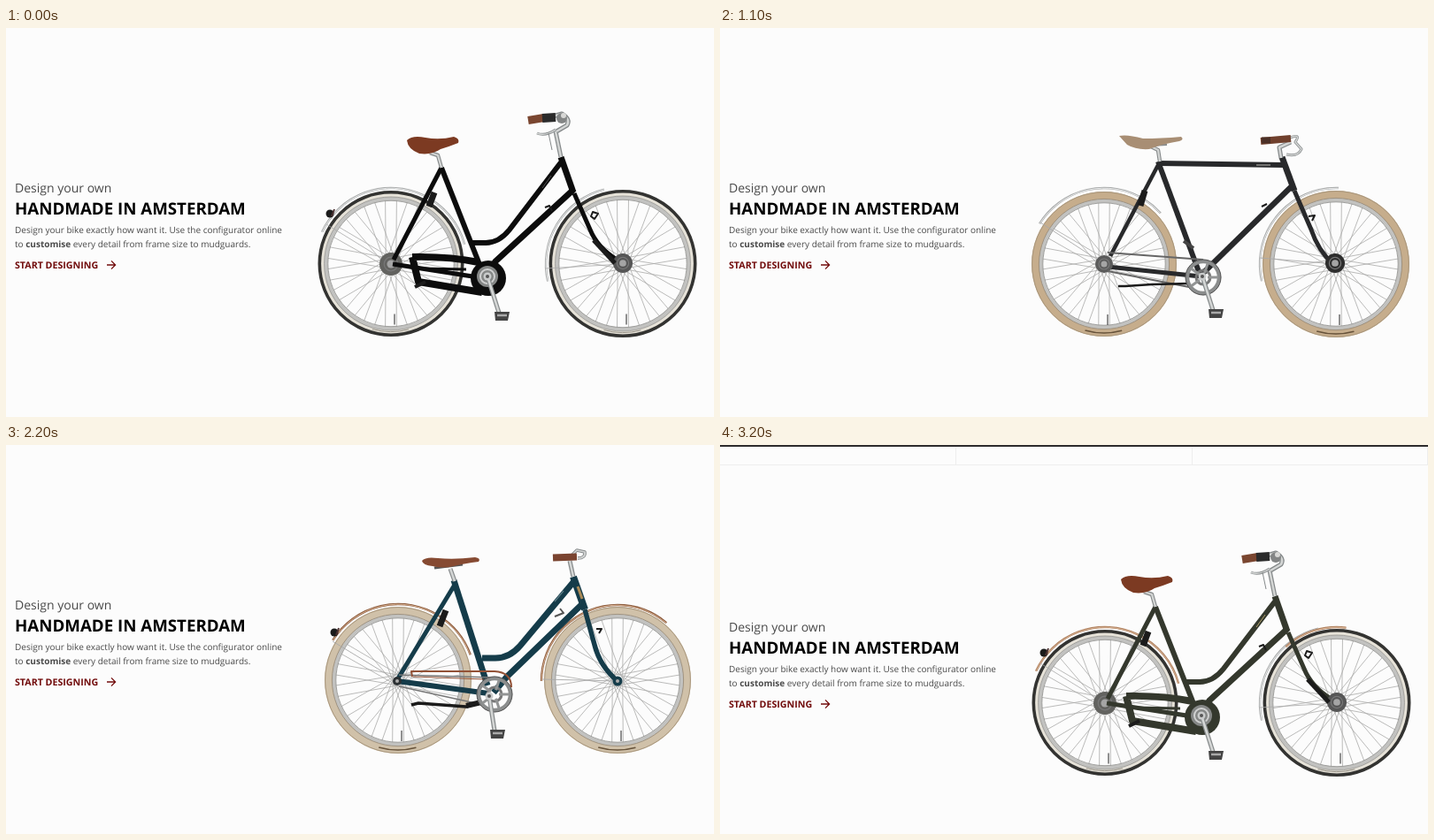
An HTML page with a canvas that plays this animation: 800x440 px, repeating every 3300 ms.

```html
<!DOCTYPE html>
<html lang="en">
<head>
<meta charset="utf-8">
<title>Bike configurator</title>
<style>
  html, body { margin: 0; width: 100%; height: 100%; overflow: hidden; background: #fcfcfc; }
  canvas, svg { position: absolute; left: 0; top: 0; }
  text { font-family: "Open Sans", sans-serif; text-rendering: geometricPrecision; fill: #4a4a4a; }
  .lead { font-size: 14px; }
  .title { font-size: 18.72px; font-weight: 700; fill: #000; }
  .body { font-size: 10.02px; }
  .link { font-size: 10.67px; font-weight: 700; fill: #720d0d; }
  .bold { font-weight: 700; }
</style>
</head>
<body>
<canvas id="stage" width="800" height="440"></canvas>
<svg width="800" height="440">
  <g id="copy">
    <text class="lead" x="10" y="186">Design your own</text>
    <text class="title" x="10" y="211">HANDMADE IN AMSTERDAM</text>
    <text class="body" x="10" y="231.8">Design your bike exactly how want it. Use the configurator online</text>
    <text class="body" x="10" y="248.4">to <tspan class="bold">customise</tspan> every detail from frame size to mudguards.</text>
    <text class="link" x="10" y="271.6">START DESIGNING</text>
    <path d="M114 268H123.5M119 263.4L123.6 268L119 272.6" fill="none" stroke="#720d0d" stroke-width="1.3"/>
  </g>
</svg>
<script>
const ctx = document.getElementById('stage').getContext('2d');
const copy = document.getElementById('copy');
const STEP = 100, STEPS = 33, TAU = Math.PI * 2;
const SILVER = '#a9abab', STEEL = '#85898a', DARK = '#1b1b1b', BROWN = '#7c3a22', COPPER = '#b0815f';

function stroke(d, width, color) {
  ctx.lineWidth = width;
  ctx.strokeStyle = color;
  ctx.stroke(new Path2D(d));
}
function fill(d, color) {
  ctx.fillStyle = color;
  ctx.fill(new Path2D(d));
}
// Angles in degrees, clockwise from the right.
function arc(x, y, r, width, color, from = 0, to = 360) {
  ctx.beginPath();
  ctx.arc(x, y, r, from * TAU / 360, to * TAU / 360);
  ctx.lineWidth = width;
  ctx.strokeStyle = color;
  ctx.stroke();
}
function disc(x, y, r, color) {
  ctx.beginPath();
  ctx.arc(x, y, r, 0, TAU);
  ctx.fillStyle = color;
  ctx.fill();
}
function chrome(d, width) {
  stroke(d, width, STEEL);
  stroke(d, width * 0.5, '#d4d6d5');
}

function spokes(x, y, r) {
  ctx.beginPath();
  for (let i = 0; i < 36; i++) {
    const a = (i + 0.5) * TAU / 36, b = a + (i % 2 ? 1.2 : -1.2);
    ctx.moveTo(x + 6 * Math.cos(b), y + 6 * Math.sin(b));
    ctx.lineTo(x + r * Math.cos(a), y + r * Math.sin(a));
  }
  ctx.lineWidth = 0.8;
  ctx.strokeStyle = '#aaaaa9';
  ctx.stroke();
}
function wheel(x, y, r, tan) {
  const rim = tan ? r - 10.5 : r - 9;
  spokes(x, y, rim);
  arc(x, y, rim, 4.5, '#c2c2c0');
  arc(x, y, rim - 2.3, 0.8, '#8d8d8b');
  if (tan) {
    arc(x, y, r - 4.3, 8.6, tan);
    arc(x, y, r - 0.6, 1, '#a8967c');
    arc(x, y, r - 8.4, 0.8, '#938673');
    arc(x, y, r - 4, 1.6, '#66523a', 75, 106);
  } else {
    arc(x, y, r - 5, 4, '#e6e2d8');
    arc(x, y, r - 7, 0.7, '#8f8d88');
    arc(x, y, r - 1.8, 3.6, '#333331');
    arc(x, y, r - 5.4, 1, '#99948a', 75, 106);
  }
  stroke(`M${x + 4} ${y + 57}V${y + 69}`, 1.3, '#555');
}
function hub(x, y, r, color) {
  disc(x, y, r, color);
  arc(x, y, r * 0.6, 1.2, '#777');
  disc(x, y, r * 0.35, '#a5a5a5');
}
function fender(x, y, r, from, to, color) {
  arc(x, y, r, 2.4, color, from, to);
  arc(x, y, r - 0.2, 1, color === SILVER ? '#eaebeb' : '#d6b294', from, to);
}
function crank(x, y, px, py) {
  chrome(`M${x} ${y}L${px - 4} ${py - 4}`, 5);
  disc(x, y, 4.5, '#c9cbcb');
  disc(x, y, 2, '#555');
  fill(`M${px - 9} ${py - 5}H${px + 8}L${px + 6} ${py + 5}H${px - 8}Z`, '#444');
  stroke(`M${px - 6} ${py - 1}H${px + 5}`, 2.5, '#aaa');
}
function chainring(x, y) {
  arc(x, y, 18, 4.5, '#8b8d8d');
  arc(x, y, 20, 1, '#555');
  arc(x, y, 8, 3, '#777');
  for (let i = 0; i < 5; i++) {
    const a = i * TAU / 5, c = Math.cos(a), s = Math.sin(a);
    stroke(`M${x + 5 * c} ${y + 5 * s}L${x + 17 * c} ${y + 17 * s}`, 3, '#929494');
  }
}
function rearLight(x, y) {
  disc(x, y, 4.5, DARK);
  stroke(`M${x + 2} ${y + 3}L${x + 5} ${y - 5}`, 2, '#4b3030');
}

function carrierRack() {
  chrome('M651 171L655 177L664 179L731 170Q741 170 738 180L727 212Q721 228 700 248', 4);
  stroke('M706 205L728 203M700 248L703 205L724 176', 1.5, STEEL);
}
function basket() {
  fill('M657 136L732 121L727 176L651 171Z', '#e4e5e599');
  for (let i = 0; i <= 18; i++) {
    const k = i / 18;
    stroke(`M${657 + 75 * k} ${136 - 15 * k}L${651 + 76 * k} ${171 + 5 * k}`, 0.8, '#989a9a');
  }
  for (let i = 0; i <= 5; i++) {
    const k = i / 5;
    stroke(`M${657 - 6 * k} ${136 + 35 * k}L${732 - 5 * k} ${121 + 55 * k}`, i % 5 ? 0.7 : 2, '#8f9191');
  }
}

function cityBike({ geared, green, copper, springs, carrier, mesh, lock }) {
  const paint = green ? '#34382d' : '#0c0c0c', guard = copper ? COPPER : SILVER;
  wheel(435, 266.5, 82.5);
  wheel(697, 266.5, 83.5);
  fender(435, 267, 86, 205, 345, guard);
  fender(697, 267, 87, 167, 256, SILVER);
  if (copper) fender(697, 267, 86, 228, 277, COPPER);
  stroke('M609 272L697 267M362 222L435 267', 0.8, '#aaa');
  rearLight(366, 210);

  if (geared) {
    hub(435, 267, 13, '#62625f');
  } else {
    disc(435, 267, 6, STEEL);
  }
  stroke('M492 158L438 262', 5, paint);
  stroke('M437 267L540 283', 5, paint);
  stroke('M492 158L538 275', 6, paint);
  stroke('M627 152L569 228Q557 243 542 243H524', 6, paint);
  stroke('M641 183L553 264L543 280', 7, paint);
  stroke('M627 146L641 186', 7, paint);
  stroke(geared ? 'M642 187L660 228Q668 248 690 262' : 'M642 187L660 228Q666 242 682 252T698 266', 5, paint);
  stroke('M616 167L606 181', 1, green ? '#b7a56f' : '#555');
  stroke('M484 186L478 202', 7, DARK);
  stroke('M663 208L669 210L665 216L661 213Z', 2, DARK);
  stroke('M609 203L614 201L617 207', 2, DARK);
  if (geared) {
    hub(697, 266, 11, '#565656');
    stroke('M664 240L688 266', 5, DARK);
  } else {
    disc(697, 266, 3.5, STEEL);
  }

  // Chain case
  stroke('M459 259Q500 258 534 265M459 259L466 287L538 299', 8, paint);
  stroke('M468 272L520 273', 3, paint);
  stroke('M462 293L474 287', 4, DARK);
  disc(545, 283, 20, paint);
  disc(544, 281, 12, '#858786');
  arc(544, 281, 8, 2, '#d0d1d1');
  crank(544, 281, 561, 326);

  chrome('M479 141L488 144L492 158', 4.5);
  if (springs) {
    for (let i = 0; i < 4; i++) stroke(`M457 ${132 + i * 4}Q463 ${136 + i * 4} 469 ${133 + i * 4}`, 2.4, '#666');
    stroke('M466 142L502 134', 2, STEEL);
    fill('M464 127Q475 122 488 125Q503 123 511 125Q513 130 503 133Q490 139 476 137Q464 135 464 127Z', '#944a2d');
  } else {
    fill('M453 127Q459 121 474 124Q490 127 506 123Q513 125 511 130Q501 134 491 137Q481 144 467 142Q454 137 453 127Z', BROWN);
  }

  chrome('M627 146L621 117', 5);
  chrome('M611 102L628 97Q638 103 634 110L622 117', 5);
  disc(628, 102, 6, '#838585');
  disc(630, 99, 3, '#d8d8d6');
  stroke('M590 104.5L608 101.5', 9, '#7a4630');
  if (geared) {
    stroke('M606 102L621 101', 10, '#2b2b2b');
    chrome('M600 119Q609 123 621 115', 3);
    stroke('M613 119L617 138', 1, STEEL);
  }

  if (carrier) carrierRack();
  if (mesh) basket();
  if (lock) {
    fill('M475 178Q475 166 492 167Q508 165 509 178Q511 189 500 188L482 190Q474 188 475 178Z', '#141414');
    ctx.fillStyle = '#ddd';
    ctx.font = '700 9px "Open Sans", sans-serif';
    ctx.fillText('Q E V', 481, 183);
  }
}

function roadster({ motor }) {
  const paint = '#28292b', tan = '#c6ad8c';
  wheel(434, 267, 82, tan);
  wheel(696, 267, 83, tan);
  fender(434, 267, 86, 212, 318, SILVER);
  fender(696, 267, 86, 167, 272, SILVER);
  stroke('M610 260L696 267M362 220L434 267', 0.9, '#aaa');

  stroke('M495 155L441 258', 4.5, paint);
  stroke('M438 270L543 281', 5, paint);
  stroke('M495 151L543 281', 6, paint);
  stroke('M495 153L638 155', 6, paint);
  stroke('M647 178L545 278', 6.5, paint);
  stroke('M635 146L649 184', 7, paint);
  stroke('M649 184L668 228Q676 252 692 266', 5, paint);
  stroke('M606 155H622', 1.2, '#a5a5a0');
  stroke('M480 184L475 201', 7, DARK);
  stroke('M665 213L672 212L669 218', 2, DARK);
  stroke('M612 202L618 199', 2, DARK);
  stroke('M524 241L535 249', 4, '#444');
  if (motor) {
    disc(434, 267, 21, '#565656');
    arc(434, 267, 19, 2, '#3b3b3b');
    arc(434, 267, 11, 1, '#777');
    disc(434, 267, 5, '#8c8c8c');
  } else {
    hub(434, 267, 10, '#5b5b5b');
  }
  hub(695, 266, 11, '#2d2d2d');
  stroke('M438 254L546 262M438 275L530 293', 1.8, '#666');
  stroke('M450 292H458L488 290L530 289', 2.6, DARK);
  chainring(546, 282);
  crank(545, 281, 561, 323);

  chrome('M487 134L495 138L497 151', 4.5);
  stroke('M468 134L505 132', 2, STEEL);
  fill('M451 122Q460 120 478 125Q498 125 521 123Q525 126 519 128Q500 131 485 137Q470 138 460 132Z', '#a88e74');
  chrome('M634 147L632 135L645 129', 5);
  chrome('M644 124Q657 119 650 129L657 137Q653 146 640 143', 3);
  stroke('M611 128L645 125', 8, '#70402d');
  stroke('M612 127H622', 7, '#4b3027');
}

function sportBike({ copper, guard, lamp, rack }) {
  const paint = '#153c4a', tan = '#d0c1a9', trim = copper ? '#8d5b3c' : SILVER;
  wheel(443, 266, 83, tan);
  wheel(691, 266, 83, tan);
  fender(443, 267, 87, 212, 340, trim);
  fender(691, 267, 86, 180, 310, trim);
  stroke('M606 265L691 267M369 222L443 267', 0.9, '#aaa');
  rearLight(371, 212);

  stroke('M507 158L443 264', 5, paint);
  stroke('M442 267L545 281', 6, paint);
  stroke('M506 153L544 272', 7, paint);
  stroke('M642 154L581 227Q569 241 553 241H538', 7, paint);
  stroke('M652 179L566 262L551 280', 7, paint);
  stroke('M641 149L654 186', 8, paint);
  stroke('M654 186L665 226Q671 250 691 267', 5.5, paint);
  stroke('M630 165L620 177', 1.2, '#5c7c85');
  stroke('M646 160L651 174', 3, '#aa8a57');
  stroke('M497 187L490 205', 7, DARK);
  stroke('M667 208L673 208L670 213', 2, DARK);
  stroke('M620 194L630 190L626 185', 2, '#555');
  disc(442, 267, 5, '#2b3033');
  disc(442, 267, 2, '#aaa');
  disc(691, 267, 5.5, paint);
  disc(691, 267, 2, '#aaa');
  stroke('M444 260L551 263M444 273L535 293', 1.7, '#777');
  stroke('M458 294L466 292L520 296L537 291', 3.5, DARK);
  stroke('M520 295L537 291', 6, DARK);
  chainring(552, 282);
  if (guard) {
    stroke('M459 262L458 256H552Q571 257 571 274', 2, '#925136');
    stroke('M460 262L540 265', 1.2, '#925136');
  }
  crank(546, 284, 556, 327);

  chrome('M502 140L507 154', 5);
  stroke('M484 139L516 135', 3, '#555');
  fill('M470 131Q474 126 488 128Q506 130 530 127Q537 128 534 132Q518 134 506 137Q494 140 482 137Q471 136 470 131Z', '#864a32');
  chrome('M641 149L637 131', 5);
  chrome('M638 126L645 119L654 121Q655 128 646 128', 3.5);
  stroke('M618 127.5L645 126.5', 8, '#7a4430');

  if (lamp) {
    stroke('M728 194L735 190', 2, STEEL);
    fill('M732 190L742 187V198L735 199Z', '#9ea2a3');
  }
  if (rack) {
    chrome('M466 167H394Q384 168 388 178L424 234L441 262', 3.2);
    stroke('M392 174H461M466 167L463 172M420 168L440 258M378 274L441 262', 1.4, '#909293');
    fill('M426 165H440L438 247H432Z', '#444649');
  }
}

function hand() {
  const d = 'M648 65.5Q649 64.5 650 66V68L653.5 69V72L652 74H648.5L646 70.5L648 70Z';
  fill(d, '#fff');
  stroke(d, 1, '#333');
}

function draw(now) {
  const step = Math.floor(now / STEP) % STEPS;
  const scrolled = step >= 28;
  const stage = scrolled ? step - 29 : step;
  const shift = scrolled ? 25 : 0;
  copy.setAttribute('transform', `translate(0 ${shift})`);
  ctx.setTransform(1, 0, 0, 1, 0, 0);
  ctx.fillStyle = '#fcfcfc';
  ctx.fillRect(0, 0, 800, 440);
  if (scrolled) {
    stroke('M0 22.5H800M266.5 2V22M533.5 2V22M799.5 2V22', 1, '#eeeeee');
    ctx.fillStyle = '#2e2c2e';
    ctx.fillRect(0, 0, 800, 2);
  }
  ctx.translate(0, shift);
  ctx.lineJoin = 'round';
  if (stage < 9) {
    cityBike({
      geared: stage >= 0, green: stage >= 2, copper: stage >= 3, springs: stage >= 4,
      carrier: stage >= 5, mesh: stage >= 6, lock: stage >= 7
    });
  } else if (stage < 18) {
    roadster({ motor: stage >= 12 });
  } else {
    sportBike({ copper: stage >= 21, guard: stage >= 22, lamp: stage >= 23, rack: stage >= 24 });
  }
  if (stage >= 26) hand();
}

const start = performance.now();
function tick() {
  draw(performance.now() - start);
  requestAnimationFrame(tick);
}
tick();
</script>
</body>
</html>
```
